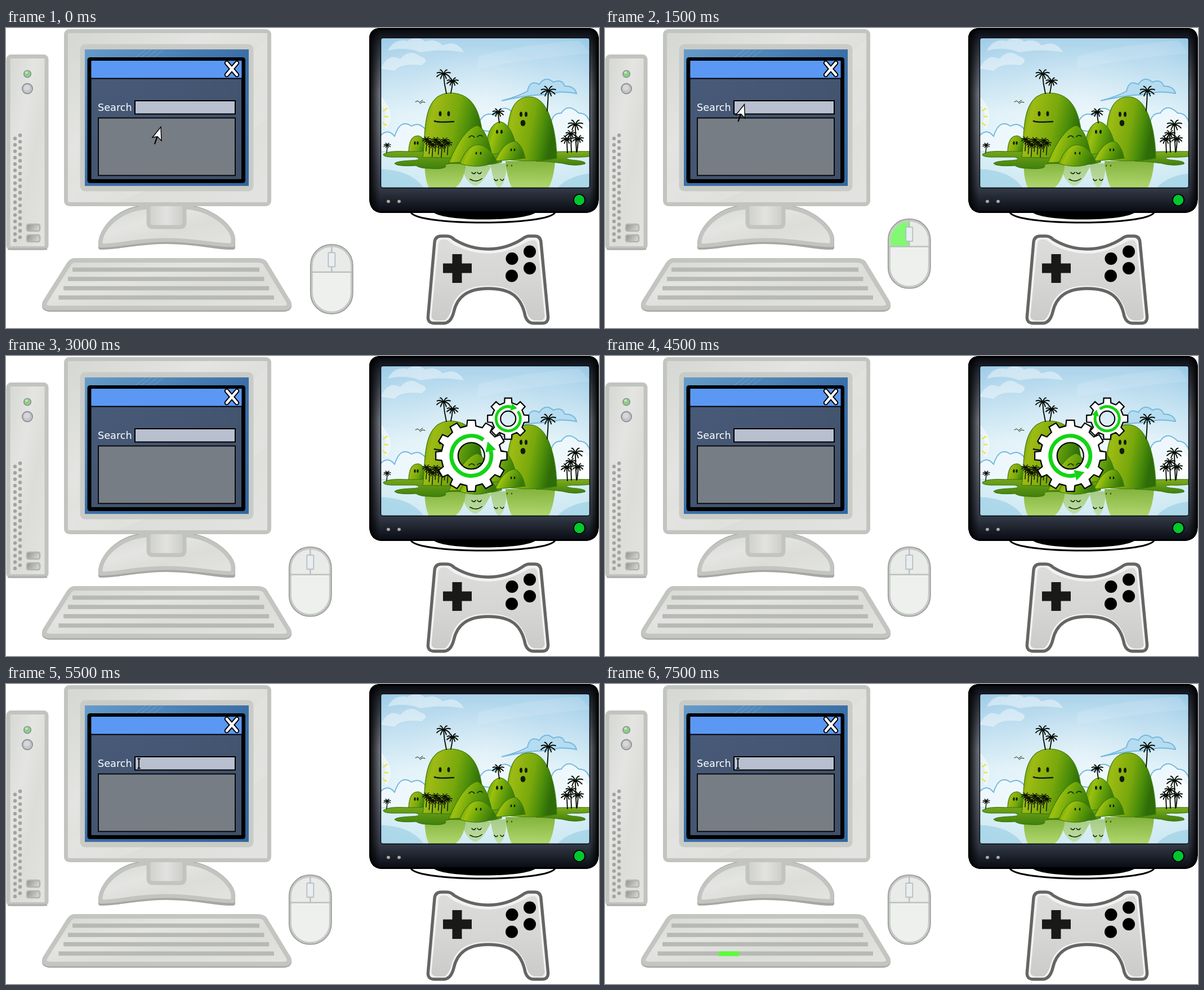
An HTML page that plays this animation: 1053x532 px, repeating every 8 s.

```html
<!DOCTYPE html>
<html lang="en">
<head>
<meta charset="utf-8">
<title>Computer and console</title>
<style>
html, body { margin: 0; width: 100%; height: 100%; overflow: hidden; background: #fff; }
svg { display: block; width: 100%; height: 100%; }
</style>
</head>
<body>
<svg viewBox="0 0 1053 532">
  <defs>
    <linearGradient id="shell" x2="1" y2="1">
      <stop offset="0" stop-color="#d5d7d3"/><stop offset=".35" stop-color="#e4e5e2"/>
      <stop offset=".6" stop-color="#dcddd9"/><stop offset="1" stop-color="#e3e4e1"/>
    </linearGradient>
    <linearGradient id="neck">
      <stop offset="0" stop-color="#cfd0cc"/><stop offset=".5" stop-color="#e2e3e0"/><stop offset="1" stop-color="#cbccc8"/>
    </linearGradient>
    <linearGradient id="port" x2="1" y2=".4">
      <stop offset="0" stop-color="#8f908d"/><stop offset="1" stop-color="#d2d3d0"/>
    </linearGradient>
    <linearGradient id="desk" x2="1" y2="1">
      <stop offset="0" stop-color="#669cca"/><stop offset=".5" stop-color="#3a6fa8"/><stop offset="1" stop-color="#31679f"/>
    </linearGradient>
    <linearGradient id="win" x2="1" y2="1">
      <stop offset="0" stop-color="#485b7a"/><stop offset="1" stop-color="#405068"/>
    </linearGradient>
    <linearGradient id="tv" x2="0" y2="1">
      <stop offset="0" stop-color="#05070c"/><stop offset=".08" stop-color="#262b36"/>
      <stop offset=".35" stop-color="#747983"/><stop offset=".55" stop-color="#6a6f7a"/>
      <stop offset=".86" stop-color="#373e4b"/><stop offset="1" stop-color="#080b13"/>
    </linearGradient>
    <linearGradient id="tvSide">
      <stop offset="0" stop-color="#000" stop-opacity=".9"/><stop offset=".045" stop-color="#000" stop-opacity="0"/>
      <stop offset=".96" stop-color="#000" stop-opacity="0"/><stop offset="1" stop-color="#000" stop-opacity=".9"/>
    </linearGradient>
    <linearGradient id="sky" x2="0" y2="1">
      <stop offset="0" stop-color="#a3cfe9"/><stop offset=".25" stop-color="#bfdff0"/>
      <stop offset=".5" stop-color="#dff1f8"/><stop offset=".75" stop-color="#eef8fb"/><stop offset="1" stop-color="#c4e3ef"/>
    </linearGradient>
    <radialGradient id="skyGlow" cx=".48" cy=".42" r=".75">
      <stop offset="0" stop-color="#fff" stop-opacity=".4"/><stop offset=".5" stop-color="#fff" stop-opacity=".08"/>
      <stop offset="1" stop-color="#4ea2d3" stop-opacity=".36"/>
    </radialGradient>
    <linearGradient id="hill" x2="1" y2=".25">
      <stop offset="0" stop-color="#4f930c"/><stop offset=".22" stop-color="#9ebb14"/>
      <stop offset=".6" stop-color="#78a80c"/><stop offset=".82" stop-color="#4a8c0a"/><stop offset="1" stop-color="#2d6c08"/>
    </linearGradient>
    <linearGradient id="hill2" x2="1" y2=".3">
      <stop offset="0" stop-color="#4b8f0a"/><stop offset=".35" stop-color="#9cc00e"/>
      <stop offset=".65" stop-color="#64a00a"/><stop offset="1" stop-color="#387808"/>
    </linearGradient>
    <linearGradient id="land" x2="0" y2="1">
      <stop offset="0" stop-color="#80ad1c"/><stop offset="1" stop-color="#3f800c"/>
    </linearGradient>
    <linearGradient id="echo" x2="0" y2="1">
      <stop offset="0" stop-color="#74a81c"/><stop offset="1" stop-color="#b2da60"/>
    </linearGradient>
    <linearGradient id="pad" x2="0" y2="1">
      <stop offset="0" stop-color="#dcdddb"/><stop offset=".5" stop-color="#d6d7d5"/><stop offset="1" stop-color="#cbccca"/>
    </linearGradient>
    <clipPath id="view"><rect x="665.5" y="17.5" width="371" height="266" rx="4"/></clipPath>
  </defs>

  <!-- tower -->
  <rect x="4" y="50.5" width="68" height="340" rx="5" fill="url(#shell)" stroke="#c1c3bf" stroke-width="7"/>
  <path d="M3 392H73" stroke="#aeb0ac" stroke-width="3"/>
  <circle cx="38" cy="81.5" r="6.3" fill="#8fca8b" stroke="#8d958c" stroke-width="1.6"/>
  <circle cx="36.5" cy="79" r="2.3" fill="#c5e8c0"/>
  <circle cx="38" cy="107.5" r="9" fill="#c5c6c9" stroke="#909294" stroke-width="2"/>
  <circle cx="37" cy="106" r="5" fill="#d6d7da"/>
  <g id="vents" fill="#a2a4a2"></g>
  <g fill="url(#port)" stroke="#b2b4b0" stroke-width="2.5">
    <rect x="37" y="348" width="23" height="12" rx="3"/><rect x="37" y="367" width="23" height="12" rx="3"/>
  </g>

  <!-- stand -->
  <path d="M168 389V379C172 351 205 318 255 317H317C364 320 402 353 403 374V389C373 390 342 379 285 379S197 390 168 389Z" fill="#dddeda" stroke="#a5a7a3" stroke-width="8" stroke-linejoin="round"/>
  <path d="M168 386V377C173 351 205 319 255 318H317C364 320 402 353 403 374V385C373 386 342 376 285 376S197 387 168 386Z" fill="url(#shell)" stroke="#c2c4c0" stroke-width="7" stroke-linejoin="round"/>
  <path d="M253 311V345Q253 353 261 353H309Q317 353 317 345V311Z" fill="url(#neck)" stroke="#c2c4c0" stroke-width="7"/>

  <!-- monitor -->
  <rect x="106.5" y="5.5" width="361" height="307" rx="6" fill="url(#shell)" stroke="#c2c4c0" stroke-width="7"/>
  <path d="M110 280Q290 180 464 20V160Q330 255 200 309H110Z" fill="#fff" opacity=".1"/>
  <rect x="135.5" y="32.5" width="300" height="253" rx="5" fill="#c7c9c5" stroke="#c9cbc7" stroke-width="8"/>
  <rect x="140" y="38" width="291" height="242" fill="url(#desk)"/>
  <path d="M230 52L248 38M240 52L258 38M251 52L269 38M262 52L280 38" stroke="#82afd4" opacity=".7"/>
  <rect x="148" y="55.5" width="273.5" height="216" rx="1" fill="url(#win)" stroke="#000" stroke-width="7" stroke-linejoin="round"/>
  <path d="M151.5 58H418.5V89H151.5Z" fill="#5b98f4"/>
  <path d="M151 89.5H419" stroke="#000" stroke-width="1.8"/>
  <g fill="none" stroke-linecap="round">
    <path d="M392 62L410 83M410 62L392 83" stroke="#000" stroke-width="8.5"/>
    <path d="M392 62L410 83M410 62L392 83" stroke="#fff" stroke-width="4.6"/>
  </g>
  <text x="163" y="147" fill="#fff" font-size="17.7" font-family="'DejaVu Sans', sans-serif">Search</text>
  <g stroke="#000" stroke-width="2">
    <rect x="229" y="129" width="178" height="23.5" fill="#b8c0d0"/>
    <rect x="164" y="159.5" width="243" height="102" fill="#777d85" stroke-width="1.8"/>
  </g>

  <!-- keyboard -->
  <path d="M122 413H447Q456 413 460 418L502 488Q506 499 492 499H79Q65 499 69 488L112 419Q116 413 122 413Z" fill="#d9dad6" stroke="#a9aba7" stroke-width="8.5"/>
  <path d="M122 412H447Q456 412 460 417L502 486Q506 496.500 492 496.500H79Q65 496.500 69 486L112 418Q116 412 122 412Z" fill="url(#shell)" stroke="#c3c5c1" stroke-width="8"/>
  <path d="M118 428.5H450M110 445H458.5M102 461.5H467M93.5 478H476" stroke="#b7b9b5" stroke-width="7.5"/>
  <rect id="key" width="36" height="8.5" fill="#5dfb3b"/>

  <!-- mouse, drawn around its centre -->
  <g id="mouse">
    <rect x="-37.5" y="-61.5" width="75" height="123" rx="37" fill="#c6c8c6" stroke="#9c9e9c" stroke-width="1.8"/>
    <rect x="-33.5" y="-57" width="67" height="114" rx="33" fill="#eef0ee"/>
    <path d="M-33.5-12H33.5V-24A33.5 33-33.5 0 0 0-57A33.5 33 0 0 0-33.5-24Z" fill="#e9ebe9"/>
    <path id="left" d="M-33.5-13.5V-24A33.5 33 0 0 1-.5-57V-13.5Z" fill="#82f873"/>
    <path d="M-36-12.5H36M0-59V-12" fill="none" stroke="#b9bcba" stroke-width="2.2"/>
    <rect x="-6" y="-47" width="12" height="25" rx="1" fill="#e9eef1" stroke="#b3bcc2" stroke-width="1.7"/>
  </g>

  <!-- television -->
  <path d="M719 327C731 351 963 351 975 327" fill="#fff" stroke="#000" stroke-width="2.8"/>
  <path d="M758 326C774 344 926 344 942 326Z"/>
  <path id="case" d="M666 1.5H1033Q1049 1.5 1051 17V304Q1050 326 1028 326.5H668Q648 326 646.5 304V17Q648 1.5 666 1.5Z" fill="url(#tv)"/>
  <use href="#case" fill="none" stroke="#000" stroke-width="3"/>
  <path d="M666 1.5H1033Q1049 1.5 1051 17V304Q1050 326 1028 326.5H668Q648 326 646.5 304V17Q648 1.5 666 1.5Z" fill="url(#tvSide)" stroke="#000" stroke-width="3"/>
  <g clip-path="url(#view)">
    <rect x="665" y="17" width="373" height="267" fill="url(#sky)"/>
    <rect x="665" y="17" width="373" height="267" fill="url(#skyGlow)"/>
    <g fill="#fff" opacity=".42">
      <path d="M665 72Q680 43 700 55Q716 36 735 50Q754 56 738 66Q700 62 690 76Z"/>
      <path d="M678 40Q690 18 713 23Q729 12 744 24Q764 18 775 31Q801 20 813 43Q770 36 736 43Q710 32 678 40Z"/>
      <path d="M838 50Q918 30 1018 22L1037 45Q960 50 838 72Z" opacity=".3"/>
    </g>
    <g fill="#eef8fc" stroke="#75b9df" stroke-width="2">
      <path d="M880 129Q908 122 926 112Q930 91 947 100Q957 84 972 96Q988 90 992 103Q1010 103 1013 116Q985 110 960 118Q930 118 880 129Z" fill="#b5dcf0"/>
      <path d="M940 220Q958 204 967 182Q966 150 986 151Q998 132 1017 151Q1032 150 1038 170V222Z"/>
      <path d="M665 219V191Q678 177 690 192Q700 160 720 174Q736 164 750 187V220Z"/>
      <path d="M835 180Q846 144 868 155Q884 130 904 154V190Z"/>
    </g>
    <path d="M980 219Q983 181 1002 183Q1019 160 1038 184V222Z" fill="#fff" opacity=".8"/>
    <g fill="none">
      <path d="M665 132Q683 149 672 171M665 124Q691 151 674 178" stroke="#fff" stroke-width="4" opacity=".5"/>
      <path d="M670 147L677 142M672 157L679 157M669 168L676 173" stroke="#f2e23c" stroke-width="2.5"/>
    </g>
    <path d="M665 218H1038V284H665Z" fill="#d9eff6" opacity=".75"/>
    <path d="M665 250Q720 252 742 284H665ZM1038 258Q998 262 979 284H1038Z" fill="#8bc7e2" opacity=".5"/>
    <g fill="url(#echo)" opacity=".85">
      <path d="M744 238H817Q814 280 786 290H754Q742 268 744 238Z"/>
      <path d="M887 236H975Q973 269 960 290H902Q890 272 887 236Z"/>
      <path d="M808 244H862Q846 278 833 280Q817 276 808 244ZM860 240H890Q886 281 875 283Q866 279 860 240Z" opacity=".6"/>
    </g>
    <g fill="url(#land)" stroke="#32710b" stroke-width="1">
      <path d="M670 224Q680 217 712 219L760 212H880V238Q850 246 812 241Q774 238 781 246Q776 251 752 249Q735 249 728 244Q694 246 690 240Q694 236 718 235Q742 234 728 229L684 229Q669 228 670 224Z"/>
      <path d="M940 222Q978 218 1040 219Q1050 222 1044 226Q1030 230 1004 229Q986 231 1004 234Q1032 236 1028 241Q1010 246 988 240Q962 236 940 236Z"/>
    </g>
    <g fill="url(#hill)" stroke="#3a7908" stroke-width="1.2">
      <path d="M715 219Q716 191 732 191Q744 193 750 219Z"/>
      <path d="M740 229C746 193 736 116 789 115C839 116 843 165 849 205V232Z"/>
      <path d="M885 232C893 200 882 123 929 122C963 121 977 180 978 231Q930 240 885 232Z"/>
      <g fill="url(#hill2)">
        <path d="M851 225Q853 170 878 166Q899 171 908 219Z"/>
        <path d="M786 239Q811 180 836 173Q854 176 865 235Z"/>
        <path d="M868 236Q884 201 904 201Q916 206 922 231Z"/>
        <path d="M806 240Q818 208 838 207Q858 208 872 238Q836 251 806 240Z"/>
      </g>
    </g>
    <g id="eyes" fill="#111c06"></g>
    <g fill="none" stroke="#111c06" stroke-linecap="round">
      <path d="M761 165Q767 168 795 166" stroke-width="2.6"/>
      <path d="M822 194Q827 188 832 194M837 193Q841 188 846 192M827 256Q831 261 834 256M837 256Q841 261 844 256M824 268Q835 275 845 267M867 268Q870 273 873 269M878 268Q880 273 884 268" stroke-width="1.5"/>
      <path d="M727 131L731 129L734 132L740 128M735 134L740 131L744 132" stroke-width="1"/>
    </g>
    <ellipse cx="918" cy="168.5" rx="4.3" ry="5.5" fill="#111c06"/>
    <g id="palms" fill="none" stroke="#070d05" stroke-linecap="round"></g>
  </g>
  <rect x="665.5" y="17.5" width="371" height="266" rx="4" fill="none" stroke="#05080d" stroke-width="1.5"/>
  <g fill="#aaa" stroke="#151719" stroke-width="1"><circle cx="679" cy="307.5" r="3.5"/><circle cx="698" cy="307.5" r="3.5"/></g>
  <circle cx="1018" cy="305" r="10" fill="#00c82d" stroke="#000" stroke-width="1.7"/>

  <!-- gamepad -->
  <g stroke-linejoin="round">
    <path d="M773 369H783Q790 369 796 375Q824 392 856 392Q889 392 917 374Q923 369 930 369H939Q949 369 950 380L962.5 511Q963.5 523 953 523.5H936Q926 523 922 511C915 476 896 462 856 462C820 462 801 476 795 504Q790 523 778 523.5H760Q748 523 749.5 511L761 380Q762 369 773 369Z" fill="#f1f2f1" stroke="#646664" stroke-width="5.4"/>
    <path d="M775 375H782Q790 380 796 385Q826 400 856 400Q887 400 922 381Q929 376 938 376Q943 378 944 385L956.5 511Q956.5 517 950 518.5H939Q930 517 926 507C917 471 894 457 856 457C818 457 796 472 790 502Q784 518 777 518.5H763Q755 517 755.5 510L768 383Q769 375 775 375Z" fill="url(#pad)"/>
  </g>
  <path d="M792.5 401H809.5V417.5H827V434.5H809.5V452H792.5V434.5H776V417.5H792.5Z" fill="#191a17"/>
  <circle cx="930" cy="396.5" r="11"/><circle cx="898.5" cy="409" r="11"/>
  <circle cx="930" cy="426" r="11"/><circle cx="898" cy="439.5" r="11"/>

  <!-- moving parts -->
  <g id="pointer" stroke="#000">
    <path d="M-6.5 17L-11 30.5" stroke-width="2.2"/>
    <path d="M0 0L-15 18.5L-6 17L1 24.5Z" fill="#f8faf8" stroke-width="1.4"/>
  </g>
  <path id="caret" d="M233.5 132.5H238.5M236 132.5V149.5M233.5 149.5H238.5" fill="none" stroke="#000" stroke-width="1.8"/>
  <path id="arrow" d="M408 159.5L476 134.5L466 148H677.5V170.5H466L476 185Z" fill="#94ff42" stroke="#000" stroke-width="2.5"/>
  <g id="gears"></g>
</svg>
<script>
const $ = id => document.getElementById(id);
const LOOP = 8000;
const polar = (r, a) => [r * Math.cos(a), r * Math.sin(a)].map(v => v.toFixed(2)).join(' ');
const rad = d => d * Math.PI / 180;

function gearPath(teeth, tip, root, hole) {
  const step = 2 * Math.PI / teeth;
  let d = '';
  for (let i = 0; i < teeth; i++) {
    const a = i * step;
    [[root, -.29], [tip, -.21], [tip, .21], [root, .29]].forEach(([r, k], j) => {
      d += (i || j ? 'L' : 'M') + polar(r, a + k * step);
    });
  }
  return `${d}ZM${hole} 0A${hole} ${hole} 0 1 1 ${-hole} 0A${hole} ${hole} 0 1 1 ${hole} 0Z`;
}

// dir is the sense in which the arrow points: 1 clockwise, -1 counter-clockwise
function gear(id, x, y, teeth, tip, root, hole, ring, width, head, base, dir) {
  const start = rad(base + dir * 39), end = rad(base);
  const tri = [polar(ring - head, end), polar(ring + head, end), polar(ring + 3, rad(base + dir * 27))];
  return `<g transform="translate(${x} ${y})">
    <path d="${gearPath(teeth, tip, root, hole)}" fill="#fff" fill-rule="evenodd" stroke="#000" stroke-width="2.2"/>
    <g id="${id}"><path d="M${polar(ring, start)}A${ring} ${ring} 0 1 ${dir > 0 ? 1 : 0} ${polar(ring, end)}" fill="none" stroke="#13d414" stroke-width="${width}"/>
    <path d="M${tri.join('L')}Z" fill="#13d414"/></g></g>`;
}

function palm(x, y, topX, topY, size) {
  let d = `M${x} ${y}Q${topX + (x - topX) * .2} ${(y + topY) / 2} ${topX} ${topY}`;
  for (const [dx, dy] of [[-1, .35], [-.95, -.2], [-.5, -.65], [.5, -.65], [1, -.2], [.9, .4], [-.45, .65], [.4, .65]]) {
    d += `M${topX} ${topY}q${dx * size * .5} ${dy * size * .5 - size * .32} ${dx * size} ${dy * size}`;
  }
  return `<path d="${d}" stroke-width="${size > 8 ? 1.9 : 1.4}"/>`;
}

let vents = '';
for (let i = 0; i < 17; i++) {
  const y = 196 + i * 11.3;
  vents += `<circle cx="16" cy="${y}" r="3.2"/><circle cx="25" cy="${y - 5.7}" r="3.2"/>`;
}
$('vents').innerHTML = vents;

$('eyes').innerHTML = [
  [771, 152, 4.5], [786, 152, 4.5], [914.5, 153, 4.5], [923.5, 153, 4.5], [872, 184, 3.5], [880, 184, 3.5],
  [835, 222, 2.5], [843, 222, 2.5], [897, 216, 2.5], [903, 216, 2.5], [726, 204, 3], [731, 204, 3],
  [890, 244, 1.5], [898, 244, 1.5]
].map(([x, y, r]) => `<ellipse cx="${x}" cy="${y}" rx="${r * .55}" ry="${r}"/>`).join('');

let palms = [
  [782, 116, 777, 82, 12], [790, 115, 793, 95, 10], [961, 147, 963, 112, 13], [876, 168, 874, 150, 10],
  [1013, 220, 1011, 172, 13], [997, 221, 996, 198, 10], [1004, 220, 1003, 188, 9], [1014, 219, 1016, 197, 9], [676, 221, 677, 208, 6]
].map(p => palm(...p)).join('');
for (let i = 0; i < 8; i++) {
  const x = 746 + i * 5.4, y = 198 + i * 5 % 14;
  palms += palm(x, y + 20, x + 1, y, 7.5);
}
$('palms').innerHTML = palms;

$('gears').innerHTML =
  gear('bigRing', 826.3, 177, 12, 63.5, 53.5, 23.5, 35.5, 7, 9.5, -14, -1) +
  gear('smallRing', 891.7, 111.2, 8, 37, 29, 13.5, 21.5, 5, 6.5, -76, 1);

const show = (id, on) => $(id).setAttribute('visibility', on ? 'visible' : 'hidden');
const move = (id, x, y) => $(id).setAttribute('transform', `translate(${x} ${y})`);

function render(t) {
  const within = (a, b) => t >= a && t < b;
  const moved = t >= 500;
  move('mouse', moved ? 540.3 : 578.3, moved ? 400.2 : 445.4);
  show('left', within(1500, 2500));

  show('pointer', t < 2500);
  move('pointer', moved ? 247.5 : 275, moved ? 135.5 : 175.5);
  show('caret', t >= 5500);

  const sending = within(2500, 3000);
  show('arrow', sending || within(5000, 5500));
  $('arrow').setAttribute('transform', sending ? 'translate(1087 0) scale(-1 1)' : '');

  show('gears', within(3000, 5000));
  const turn = 90 * Math.floor((t - 3000) / 500);
  $('bigRing').setAttribute('transform', `rotate(${-turn})`);
  $('smallRing').setAttribute('transform', `rotate(${turn})`);

  show('key', t >= 6500);
  const [x, y] = t < 7000 ? [143.5, 441] : t < 7500 ? [255, 474] : [202, 474];
  move('key', x, y);
}

const begin = performance.now();
function tick() {
  render((performance.now() - begin) % LOOP);
  requestAnimationFrame(tick);
}
tick();
</script>
</body>
</html>
```
